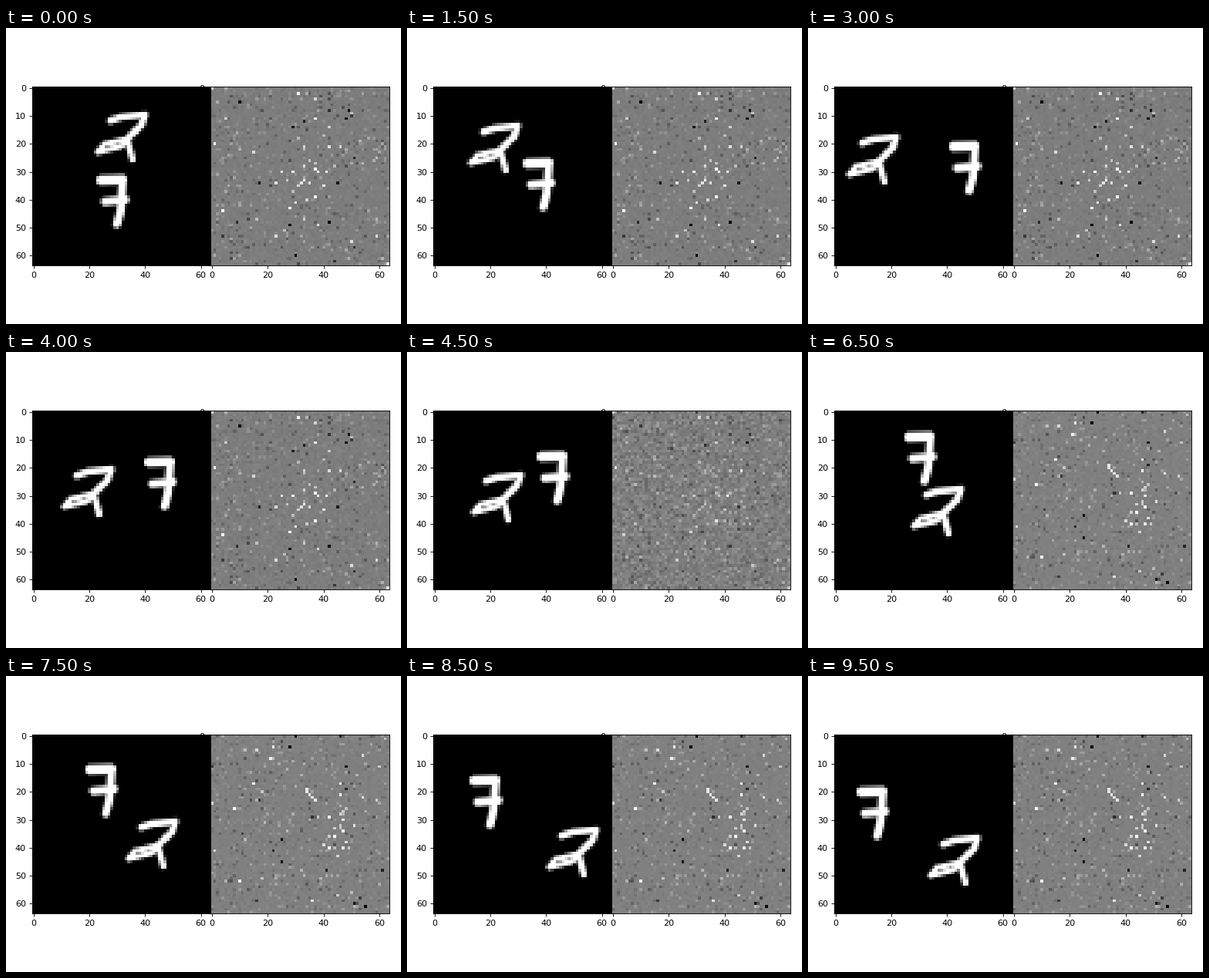
A matplotlib script for the animation above (10 s loop, 512 px wide and 384 px high).

```python
import numpy as np
import matplotlib.pyplot as plt
from matplotlib.animation import FuncAnimation

FRAMES, INTERVAL = 20, 500
SIZE, GLYPH = 64, 20
W, H, DPI = 512, 384, 80
LEFT, PANEL = 33.7, 231.5

# Pen strokes inside a 20 x 20 cell box: (radius, points)
TWO = [
    (1.25, [(6, 4.2), (10, 2.9), (18.2, 2.1), (17, 5.8), (11.9, 10.8)]),
    (1.05, [(11.9, 10.8), (4, 12.6), (1.5, 15.4), (9.4, 13.5), (12.1, 11.3)]),
    (1.15, [(12.1, 11.3), (13.9, 18)]),
]
SEVEN = [
    (1.8, [(1.7, 2.5), (9.2, 2.3)]),
    (1.45, [(9.4, 2.3), (8.6, 13.5), (7.3, 18.2)]),
    (1.5, [(3, 10.2), (10.2, 9.5)]),
]


def draw_glyph(strokes):
    y, x = np.mgrid[:GLYPH, :GLYPH] + 0.5
    ink = np.zeros((GLYPH, GLYPH))
    for radius, points in strokes:
        for (x0, y0), (x1, y1) in zip(points, points[1:]):
            dx, dy = x1 - x0, y1 - y0
            t = np.clip(((x - x0) * dx + (y - y0) * dy) / (dx * dx + dy * dy), 0, 1)
            dist = np.hypot(x - x0 - t * dx, y - y0 - t * dy)
            ink = np.maximum(ink, np.clip(radius + 0.5 - dist, 0, 1))
    return ink * 255


def bounce(pos, speed, low, high):
    """Whole-cell positions of a coordinate that stops at a wall and turns back."""
    cells = []
    for _ in range(FRAMES):
        cells.append(int(pos))
        pos += speed
        if not low < pos < high:
            pos = min(max(pos, low), high)
            speed = -speed
    return cells


def speckle(rng, body, share, spread):
    """Calm grain in which a share of the cells stands out."""
    grain = rng.normal(0, body, (SIZE, SIZE))
    outliers = rng.random((SIZE, SIZE)) < share
    return grain + outliers * rng.normal(0, spread, (SIZE, SIZE))


def scatter(rng, grid, count, center, spread, low, high):
    cells = rng.normal(center, spread, (count, 2)).astype(int) % SIZE
    grid[cells[:, 1], cells[:, 0]] = rng.uniform(low, high, count)


def weight_map(rng, base, center, spread):
    grid = base + speckle(rng, 2.5, 0.2, 20)
    middle = (SIZE / 2, SIZE / 2)
    scatter(rng, grid, 26, center, spread, 180, 255)
    scatter(rng, grid, 24, middle, 28, 170, 250)
    scatter(rng, grid, 16, middle, 28, 0, 60)
    return grid


rng = np.random.default_rng(7)
MAP_A = weight_map(rng, 125, (37, 27), (5, 11))
MAP_B = weight_map(rng, 128, (46, 33), (2.5, 7))
for step in range(5):
    MAP_B[19 + step, 34 + 3 * step // 4] = 230
MID = speckle(rng, 8, 0.15, 20)

DIGITS = [
    (draw_glyph(TWO), bounce(22.1, -3.312, 4, 40), bounce(8.4, 1.41, 4, 40)),
    (draw_glyph(SEVEN), bounce(23.9, 2.915, 7, 43), bounce(31.6, -1.95, 7, 43)),
]


def digits_at(n):
    grid = np.zeros((SIZE, SIZE))
    for glyph, xs, ys in DIGITS:
        area = grid[ys[n]:ys[n] + GLYPH, xs[n]:xs[n] + GLYPH]
        np.maximum(area, glyph, out=area)
    return grid


def weights_at(n):
    w = 1 / (1 + np.exp(-2.5 * (n - 9.2)))
    w = 0 if n < 6 else 1 if n > 11 else w
    return np.clip(MAP_A * (1 - w) + MAP_B * w + MID * 4 * w * (1 - w), 0, 255)


def add_panel(left, zorder, grid):
    ax = fig.add_axes([left / W, (H - PANEL) / 2 / H, PANEL / W, PANEL / H],
                      zorder=zorder)
    image = ax.imshow(grid, cmap="gray", vmin=0, vmax=255,
                      interpolation="nearest", aspect="auto")
    ax.set_xticks(range(0, SIZE, 20))
    ax.set_yticks(range(0, SIZE, 10))
    return image


plt.rcParams["font.family"] = "DejaVu Sans"
fig = plt.figure(figsize=(W / DPI, H / DPI), dpi=DPI, facecolor="white")
# The left panel lies over the right panel's own tick labels.
digits = add_panel(LEFT, 2, digits_at(0))
weights = add_panel(LEFT + PANEL, 1, weights_at(0))


def update(n):
    digits.set_data(digits_at(n))
    weights.set_data(weights_at(n))
    return digits, weights


anim = FuncAnimation(fig, update, frames=FRAMES, interval=INTERVAL,
                     repeat=True, repeat_delay=0)
plt.show()
```
